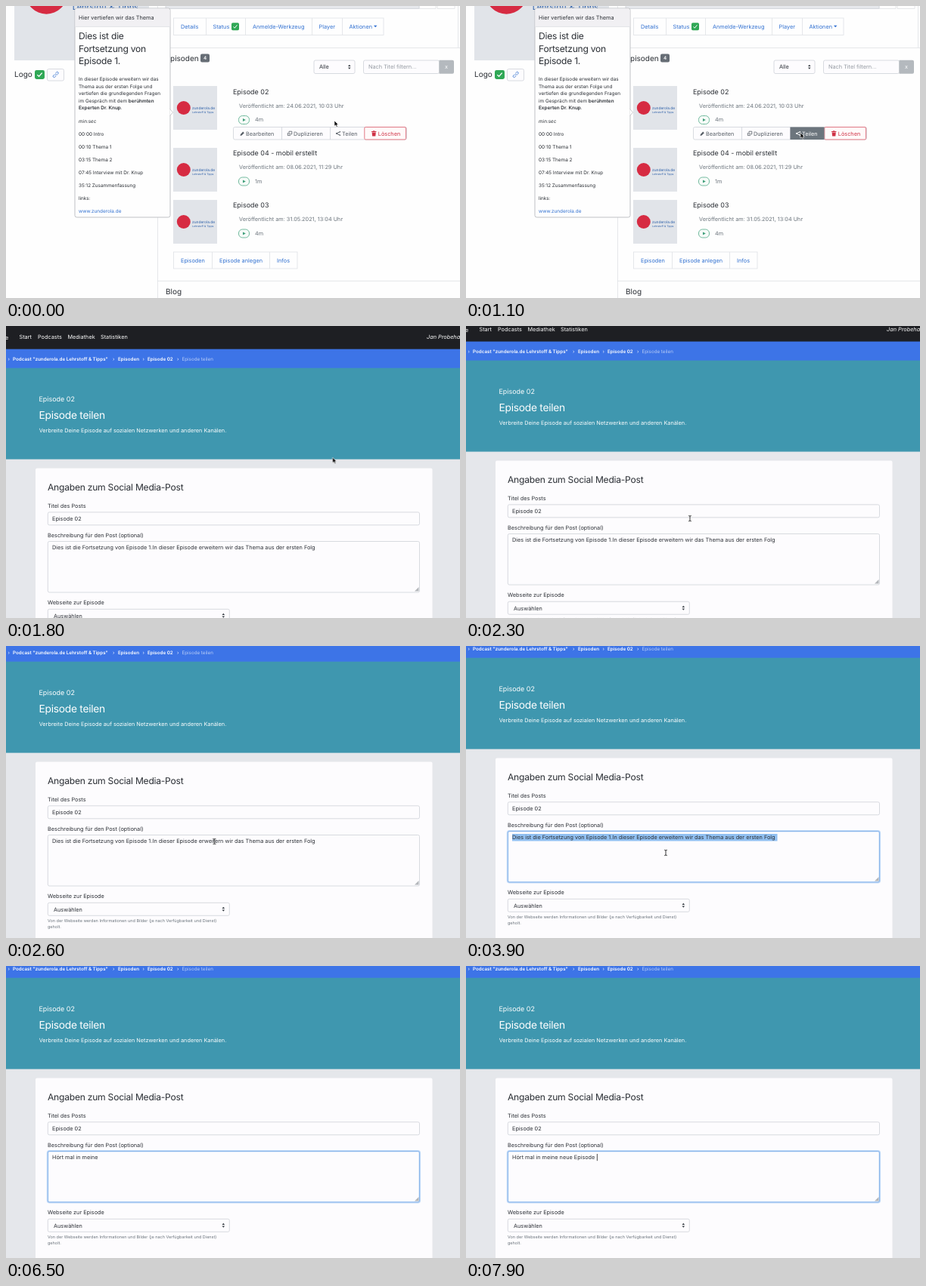
Animation of 600 by 387 pixels, one loop 8000 ms. Source, as an HTML page:

```html
<!DOCTYPE html>
<html lang="de">
<head>
<meta charset="utf-8">
<title>Episode teilen</title>
<style>
html, body { margin: 0; width: 100%; height: 100%; overflow: hidden; background: #fdfcfe; }
svg { display: block; width: 600px; height: 387px; }
text { font: 7.3px Inter, "Open Sans", sans-serif; fill: #2b2f35; white-space: pre; text-rendering: geometricPrecision; }
.small text, text.small { font-size: 6.25px; }
.note text { font-size: 6.38px; }
.tiny { font-size: 5.5px; }
.mid { font-size: 8.95px; }
.big { font-size: 10px; }
.title { font-size: 13.8px; letter-spacing: -.02em; }
.head { font-size: 12.1px; letter-spacing: -.02em; }
.bold { font-weight: 600; }
.semi text, text.semi { font-weight: 500; }
.em { font-style: italic; }
.white text, text.white { fill: #fff; }
.blue text, text.blue { fill: #2f6fd0; }
.gray text, text.gray { fill: #6c757d; }
.pale text, text.pale { fill: #a3a5ad; }
text.slate { fill: #555c64; }
text.red { fill: #cf3145; }
.box { fill: #fdfcfe; stroke: #ced2d8; stroke-width: .8; }
.line { fill: none; stroke: #dfe1e5; stroke-width: .8; }
.icon { fill: none; stroke: #555c64; stroke-width: 1; stroke-linejoin: round; }

/* one shared eight second clock */
.cut, .fade, .move { animation: 8s linear infinite; }
.cut { animation-timing-function: step-end; }
#list { animation-name: list; }
#share { animation-name: share; }
#scroll { animation-name: scroll; }
#hover { animation-name: hover; }
#form { animation-name: form; }
#footer { animation-name: footer; }
#focus { animation-name: focus; }
#mark { animation-name: mark; }
#old { animation-name: old; }
#pointer { animation-name: pointer; }
#arrow { animation-name: arrow; }
#beam { animation-name: beam; }
@keyframes list { 0% { opacity: 1 } 15%, 100% { opacity: 0 } }
@keyframes share { 0% { opacity: 0 } 15%, 100% { opacity: 1 } }
@keyframes hover { 0%, 4.5% { opacity: 0 } 6.4%, 100% { opacity: 1 } }
@keyframes form { 0% { opacity: 0 } 20%, 100% { opacity: 1 } }
@keyframes footer { 0% { opacity: 1 } 20%, 100% { opacity: 0 } }
@keyframes focus { 0%, 38.75% { opacity: 0 } 40.6%, 100% { opacity: 1 } }
@keyframes mark { 0% { opacity: 0 } 42.5% { opacity: 1 } 57.5%, 100% { opacity: 0 } }
@keyframes old { 0% { opacity: 1 } 57.5%, 100% { opacity: 0 } }
@keyframes scroll {
  0%, 26.9% { transform: translateY(40px) }
  28.75% { transform: translateY(30px) }
  32.5% { transform: translateY(5px) }
  33.75%, 100% { transform: translateY(0) }
}
@keyframes pointer {
  0% { transform: translate(434px, 152px); animation-timing-function: ease-in-out }
  6.25%, 21.25% { transform: translate(442px, 168px); animation-timing-function: ease-in-out }
  28%, 28.75% { transform: translate(296px, 255px) }
  32.5% { transform: translate(275.5px, 259px); animation-timing-function: ease-out }
  38.75%, 100% { transform: translate(264px, 274px) }
}
@keyframes arrow { 0% { opacity: 1 } 26.9%, 100% { opacity: 0 } }
@keyframes beam { 0% { opacity: 0 } 26.9% { opacity: 1 } 57.5%, 100% { opacity: 0 } }
</style>
</head>
<body>
<svg viewBox="0 0 600 387">
  <defs>
    <g id="cover">
      <rect width="58" height="58" fill="#e1e4e9"/>
      <circle cx="13.8" cy="29" r="9" fill="#d62b42"/>
      <text x="25" y="31" style="font-size:4.9px;fill:#2b5ea8">zunderola.de</text>
      <text x="25" y="36" style="font-size:3.5px;fill:#2b5ea8">Lehrstoff &amp; Tipps</text>
    </g>
    <g id="play">
      <rect x=".5" y=".5" width="14" height="11" rx="5" fill="#f6fbf8" stroke="#63b394" stroke-width=".9"/>
      <path d="M6 3.9l3.8 2.1-3.8 2.1z" fill="#3f9f7a"/>
    </g>
    <g id="check">
      <rect width="10" height="10" rx="1.8" fill="#30a856"/>
      <path d="M2.6 5.2l1.7 1.8 3.1-4" fill="none" stroke="#fff"/>
    </g>
    <path id="updown" d="M0 -.7l1.8-2.3 1.8 2.3zM0 .7l1.8 2.3 1.8-2.3z" fill="#343a40"/>
    <path id="node" d="M6 1L1 3.2L6 5.6M6 .3v1.4M1 2.5v1.4M6 4.9v1.4"/>
  </defs>

  <g id="list" class="cut">
    <rect width="600" height="387" fill="#fefefe"/>
    <use href="#cover" transform="translate(11 -106) scale(3.07)"/>
    <text class="big" x="11" y="94">Logo</text>
    <use href="#check" transform="translate(38 85) scale(1.3 1.2)"/>
    <rect class="box" x="54.5" y="83.5" width="22" height="15.5" rx="2"/>
    <path class="icon" d="M64.8 92l2-2M65.2 89.4l1.6-1.6a1.4 1.4 0 0 1 2 2l-1.6 1.6M66.2 92.6l-1.6 1.6a1.4 1.4 0 0 1-2-2l1.6-1.6" style="stroke:#2f6fd0;stroke-width:.8"/>

    <rect x="211" y="-8" width="335" height="11.5" fill="#e6e8ec" stroke="#ced2d8" stroke-width=".8"/>
    <path class="line" d="M200.5 0V387M200 55.5H600M200 364.5H600M546 0V3.5H568V0M570 0V3.5H593V0M597.5 0V55"/>
    <g class="blue">
      <rect class="line" x="221.5" y="16" width="277.5" height="22.5"/>
      <path class="line" d="M264.5 16v22.5M316.5 16v22.5M404.5 16v22.5M444.5 16v22.5"/>
      <text x="231" y="29.6">Details</text>
      <text x="273.5" y="29.6">Status</text>
      <use href="#check" x="298" y="22.2"/>
      <text x="326" y="29.6">Anmelde-Werkzeug</text>
      <text x="413.5" y="29.6">Player</text>
      <text x="453.5" y="29.6">Aktionen</text>
      <path d="M486 25.8h4.4l-2.2 2.5z" fill="#2f6fd0"/>
    </g>

    <text class="big" x="211" y="72.5">Episoden</text>
    <rect x="257" y="63.5" width="12" height="11" rx="2" fill="#666d75"/>
    <text class="small white bold" x="261" y="71.3">4</text>
    <rect class="box" x="407" y="72" width="54" height="17.5" rx="2"/>
    <text x="414" y="83.4">Alle</text>
    <use href="#updown" x="452" y="80.8"/>
    <rect class="box" x="472.5" y="72" width="100" height="17.5" rx="2"/>
    <text x="479" y="83.4" style="fill:#92989f">Nach Titel filtern...</text>
    <path d="M572.5 71.7h17.5a2 2 0 0 1 2 2v14a2 2 0 0 1-2 2h-17.5z" fill="#b4b9be"/>
    <text class="white" x="580" y="83">x</text>

    <use href="#cover" x="221" y="106"/>
    <text class="mid" x="300" y="117">Episode 02</text>
    <use href="#cover" x="221" y="188"/>
    <text class="mid" x="300" y="198.2">Episode 04 - mobil erstellt</text>
    <use href="#cover" x="221" y="257"/>
    <text class="mid" x="300" y="267.2">Episode 03</text>
    <g class="gray">
      <text x="308" y="134.6">Veröffentlicht am: 24.06.2021, 10:03 Uhr</text>
      <text x="329" y="153.4">4m</text>
      <text x="308" y="216.4">Veröffentlicht am: 08.06.2021, 11:29 Uhr</text>
      <text x="329" y="235.2">1m</text>
      <text x="308" y="285">Veröffentlicht am: 31.05.2021, 13:04 Uhr</text>
      <text x="329" y="303.8">4m</text>
    </g>
    <use href="#play" x="307" y="145"/>
    <use href="#play" x="307" y="226.5"/>
    <use href="#play" x="307" y="295.5"/>

    <rect class="box" x="300.5" y="160.5" width="229" height="16.5" rx="2"/>
    <path class="line" d="M364.5 160.5v16.5M428.5 160.5v16.5" style="stroke:#ced2d8"/>
    <rect x="473.8" y="160.5" width="54.7" height="16.5" rx="1.5" fill="#fffafa" stroke="#dc5a69" stroke-width=".8"/>
    <path d="M309.5 172l.5-2 3.2-3.4 1.6 1.6-3.3 3.3z" fill="#555c64"/>
    <text class="slate" x="317" y="171.5">Bearbeiten</text>
    <path class="icon" d="M374 166.2h3.8v3.6h-3.8zM372.3 168v3.6h3.8" style="stroke-width:.8"/>
    <text class="slate" x="380" y="171.5">Duplizieren</text>
    <use href="#node" class="icon" x="435.5" y="165.7"/>
    <text class="slate" x="444" y="171.5">Teilen</text>
    <path d="M483 166h6.4v1.1h-6.4zM485.2 165.2h2v1h-2zM483.6 167.6h5.2l-.5 4.8h-4.2z" fill="#cf3145"/>
    <text class="red" x="491.8" y="171.5">Löschen</text>
    <g id="hover" class="fade">
      <rect x="428.5" y="160.5" width="45" height="16.5" fill="#6c757d"/>
      <use href="#node" class="icon" x="435.5" y="165.7" style="stroke:#fff"/>
      <text class="white" x="444" y="171.5">Teilen</text>
    </g>

    <g class="blue">
      <rect class="line" x="221.5" y="326" width="163.5" height="22"/>
      <path class="line" d="M272.5 326v22M348.5 326v22"/>
      <text x="231" y="339.6">Episoden</text>
      <text x="282" y="339.6">Episode anlegen</text>
      <text x="358" y="339.6">Infos</text>
    </g>
    <text class="big" x="211" y="381.8">Blog</text>

    <!-- popover belongs to the hovered row, so it stays until the page changes -->
    <rect x="91" y="3" width="126" height="277" rx="2.5" fill="#fefefe" stroke="#bfc1c5"/>
    <path d="M91.5 27.5V5.5a2 2 0 0 1 2-2h121a2 2 0 0 1 2 2v22z" fill="#f1f0f3"/>
    <path d="M91 27.5h126" class="line"/>
    <path d="M216.6 136.5l4 4.5-4 4.5" fill="#fefefe" stroke="#bfc1c5" stroke-width=".8"/>
    <text x="96" y="17.7">Hier vertiefen wir das Thema</text>
    <text class="head" x="96" y="44.2">Dies ist die</text>
    <text class="head" x="96" y="60.8">Fortsetzung von</text>
    <text class="head" x="96" y="77.4">Episode 1.</text>
    <g class="note">
      <text x="96" y="99.2">In dieser Episode erweitern wir das</text>
      <text x="96" y="108.7">Thema aus der ersten Folge und</text>
      <text x="96" y="118.2">vertiefen die grundlegenden Fragen</text>
      <text x="96" y="127.7">im Gespräch mit dem <tspan class="bold">berühmten</tspan></text>
      <text x="96" y="137.2"><tspan class="bold">Experten Dr. Knup</tspan>.</text>
      <text class="em" x="96" y="155">min:sec</text>
      <text x="96" y="172">00:00 Intro</text>
      <text x="96" y="189">00:10 Thema 1</text>
      <text x="96" y="206">03:15 Thema 2</text>
      <text x="96" y="223">07:45 Interview mit Dr. Knup</text>
      <text x="96" y="240">35:12 Zusammenfassung</text>
      <text x="96" y="257">links:</text>
      <text class="blue" x="96" y="274">www.zunderola.de</text>
    </g>
  </g>

  <g id="share" class="cut">
    <g id="scroll" class="move">
      <rect y="-40" width="600" height="450" fill="#e5e7eb"/>
      <rect y="-40" width="600" height="31.5" fill="#1e1f23"/>
      <rect y="-9.4" width="600" height="26" fill="#3d74e7"/>
      <rect y="15.7" width="600" height="120.9" fill="#3f97af"/>
      <text class="white" x="-1" y="-22">e</text>
      <g class="small white">
        <text x="2.5" y="6.2">›</text>
        <text class="bold" x="9" y="6.2">Podcast "zunderola.de Lehrstoff &amp; Tipps"</text>
        <text x="141" y="6.2">›</text>
        <text class="bold" x="148" y="6.2">Episoden</text>
        <text x="180.5" y="6.2">›</text>
        <text class="bold" x="187" y="6.2">Episode 02</text>
        <text x="226" y="6.2">›</text>
        <text x="232.5" y="6.2" style="fill:#b9cdf6">Episode teilen</text>
      </g>
      <g class="white">
        <text class="mid" x="43.5" y="59.8">Episode 02</text>
        <text class="title" x="43.5" y="83.3">Episode teilen</text>
        <text x="43.7" y="101.1">Verbreite Deine Episode auf sozialen Netzwerken und anderen Kanälen.</text>
      </g>

      <g id="footer" class="cut">
        <rect x="39" y="148.5" width="524.5" height="48.5" fill="#fdfcfe"/>
        <rect y="219.2" width="600" height="34" fill="#1e1f23"/>
        <rect y="253" width="600" height="150" fill="#2d2e36"/>
        <path d="M205.5 233h5v6h-5zM206.8 234.8h2.6M206.8 236.2h2.6M206.8 237.6h2.6" fill="none" stroke="#fff" stroke-width=".8"/>
        <text x="216" y="238.7" style="fill:#8e9097">Neue Statistiken für Podcast Neulinge</text>
        <text class="white semi" x="353" y="238.7">Mehr lesen ›</text>
        <circle cx="60" cy="304" r="17.5" fill="#fff"/>
        <text class="white" x="80" y="309.5" style="font-size:10.8px">zunderola.de</text>
        <text class="white mid" x="175" y="296.3">Professionelles Podcast-Hosting aus Berlin. Mächtig flexibel. Genial einfach.</text>
        <g class="white semi">
          <text x="175" y="329.7">Unternehmen</text>
          <text x="271" y="329.7">Podcast-Plattform</text>
          <text x="366.5" y="329.7">Support</text>
          <text x="462" y="329.7">Dienst</text>
        </g>
        <g class="small pale">
          <text x="43.5" y="345.6">2007-2021 zunderola</text>
          <text x="175" y="345.6">Über uns</text>
          <text x="271" y="345.6">Podcast-Portal</text>
          <text x="366.5" y="345.6">FAQ</text>
          <text x="462" y="345.6">Tour</text>
        </g>
      </g>

      <g id="form" class="cut">
        <g class="white">
          <text x="17.5" y="-23.4">Start</text>
          <text x="42" y="-23.4">Podcasts</text>
          <text x="81.5" y="-23.4">Mediathek</text>
          <text x="125" y="-23.4">Statistiken</text>
          <text class="em" x="556" y="-23.4">Jan Probehans</text>
        </g>
        <rect x="39" y="148.5" width="524.5" height="300" rx="2" fill="#fdfcfe"/>
        <text class="head" x="55" y="178.2">Angaben zum Social Media-Post</text>
        <text x="55" y="200.8">Titel des Posts</text>
        <rect class="box" x="55.3" y="206.8" width="491.2" height="17" rx="2"/>
        <text x="61" y="218">Episode 02</text>
        <text x="55" y="239.7">Beschreibung für den Post (optional)</text>
        <rect class="box" x="55.3" y="245.5" width="491.2" height="67.5" rx="2"/>
        <g id="focus" class="fade" fill="none">
          <rect x="55" y="245.2" width="491.8" height="68" rx="2.5" stroke="#c5dcf8" stroke-width="2.6"/>
          <rect x="55.3" y="245.5" width="491.2" height="67.5" rx="2" stroke="#84b2e8" stroke-width=".9"/>
        </g>
        <path d="M540 311.5l5.5-5.5v5.5z" fill="#b4b7bb"/>
        <rect id="mark" class="cut" x="61" y="249" width="350.5" height="9.5" fill="#91c0f1"/>
        <text id="old" class="cut" x="61" y="256.2">Dies ist die Fortsetzung von Episode 1.In dieser Episode erweitern wir das Thema aus der ersten Folg</text>
        <text id="typed" x="61" y="256.2"></text>
        <rect id="caret" y="249" width=".8" height="9.2" fill="#222" opacity="0"/>
        <text x="55" y="328.6">Webseite zur Episode</text>
        <rect class="box" x="55.3" y="335.3" width="240" height="17" rx="2"/>
        <text x="63" y="346.5">Auswählen</text>
        <use href="#updown" x="285.5" y="343.8"/>
        <text class="tiny gray" x="55" y="361">Von der Webseite werden Informationen und Bilder (je nach Verfügbarkeit und Dienst)</text>
        <text class="tiny gray" x="55" y="369">geholt.</text>
      </g>
    </g>
  </g>

  <g id="pointer" class="move">
    <path id="arrow" class="cut" d="M0 0V7.2L1.7 5.7L2.9 8.3L4.2 7.7L3 5.2H5.2Z" fill="#000" stroke="#fff" stroke-width=".6"/>
    <path id="beam" class="cut" d="M-1.8-3.7Q0-3.7 0-2.6Q0-3.7 1.8-3.7M0-2.8V2.8M-1.8 3.7Q0 3.7 0 2.6Q0 3.7 1.8 3.7" fill="none" stroke="#222" stroke-width=".9"/>
  </g>
</svg>
<script>
const LOOP = 8000;
const TYPE_START = 4600;
const KEY_TIME = 108;
const message = "Hört mal in meine neue Episode ";
const typed = document.getElementById("typed");
const caret = document.getElementById("caret");
let start;

function draw(now) {
  start ??= now;
  const t = (now - start) % LOOP;
  const keys = Math.floor((t - TYPE_START) / KEY_TIME) + 1;
  const count = Math.max(0, Math.min(message.length, keys));
  typed.textContent = message.slice(0, count);

  // the caret only rests visibly once the text is complete
  const done = count === message.length;
  if (done) caret.setAttribute("x", 61.5 + typed.getComputedTextLength());
  caret.setAttribute("opacity", done ? 1 : 0);
  requestAnimationFrame(draw);
}
requestAnimationFrame(draw);
</script>
</body>
</html>
```
